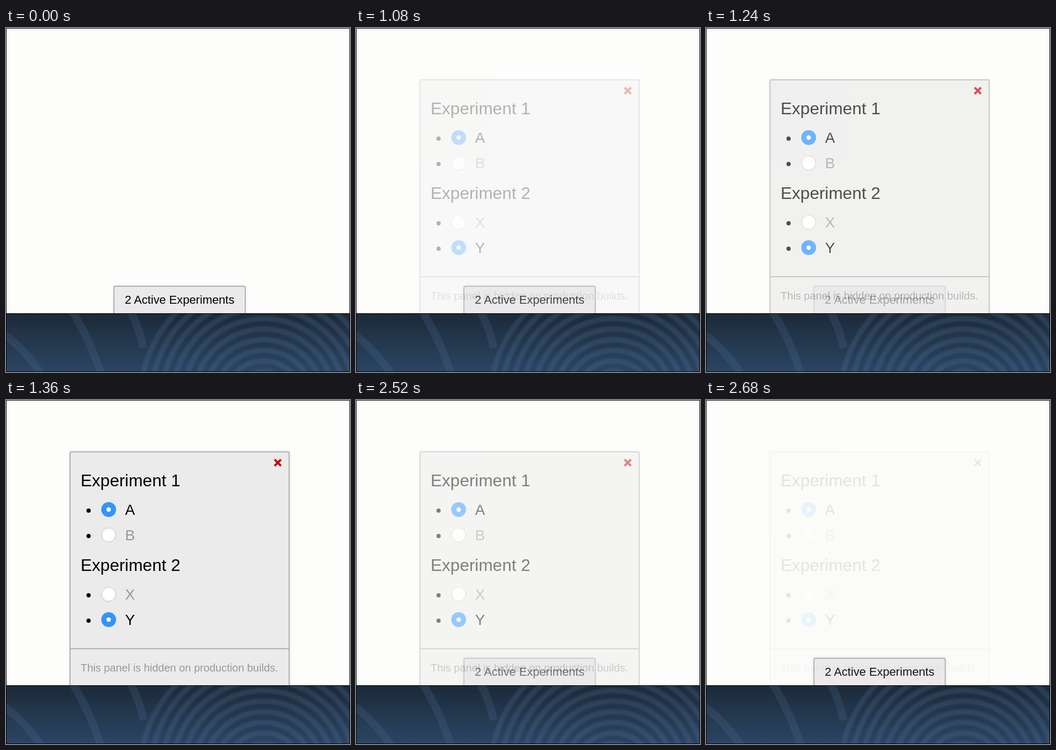
Animation of 650x650 px, one loop 2.72 s. Source, as an HTML page:

```html
<!DOCTYPE html>
<html lang="en">
<head>
<meta charset="utf-8">
<title>Experiments panel</title>
<style>
  html, body { margin: 0; width: 100%; height: 100%; overflow: hidden; background: #fdfefc; }
  svg { display: block; width: 100vw; height: 100vh; }
  text { font-family: "Liberation Sans", Arial, sans-serif; }
  .box { fill: #ebebeb; stroke: #b0b0b0; stroke-width: 2; filter: drop-shadow(0 0 2px rgba(0, 0, 0, .13)); }
  .button { fill: #ebe9ec; }
  .button-label { font-size: 22.2px; text-anchor: middle; }
  .heading { font-size: 32px; }
  .option { font-size: 28px; }
  .off { fill: #999; }
  .note { font-size: 20.3px; fill: #999; }

  /* The panel page cross-fades over the button in tenths, 40 ms each. */
  .panel { opacity: 0; animation: fade 2720ms infinite; }
  @keyframes fade {
    0%       { opacity: 0;  animation-timing-function: step-end; }
    36.7647% { opacity: .1; animation-timing-function: steps(9, end); }
    50%      { opacity: 1;  animation-timing-function: step-end; }
    86.7647% { opacity: .9; animation-timing-function: steps(9, end); }
    100%     { opacity: 0; }
  }
</style>
</head>
<body>
<svg viewBox="0 0 650 650">
  <defs>
    <linearGradient id="night" x2="0" y2="1">
      <stop offset="0" stop-color="#1c2a39"/>
      <stop offset=".5" stop-color="#24384e"/>
      <stop offset="1" stop-color="#2b4564"/>
    </linearGradient>
    <radialGradient id="rings" gradientUnits="userSpaceOnUse" cx="487" cy="702" r="20" spreadMethod="repeat">
      <stop offset="0" stop-color="#5a82ae" stop-opacity="0"/>
      <stop offset=".3" stop-color="#5a82ae" stop-opacity="0"/>
      <stop offset=".5" stop-color="#5a82ae" stop-opacity=".2"/>
      <stop offset=".8" stop-color="#5a82ae" stop-opacity=".2"/>
      <stop offset="1" stop-color="#5a82ae" stop-opacity="0"/>
    </radialGradient>
    <clipPath id="bar"><rect y="540" width="650" height="110"/></clipPath>
    <g id="radio-on">
      <circle r="14" fill="#3394fc"/>
      <circle r="4.2" fill="#fff"/>
    </g>
    <g id="radio-off">
      <circle r="13.5" fill="#fff" stroke="#b8b8b8"/>
      <path d="M-10 -8A13 13 0 0 1 10 -8" fill="none" stroke="#e4e4e4" stroke-width="2"/>
    </g>
  </defs>

  <rect width="650" height="540" fill="#fdfefc"/>
  <rect class="box button" x="204" y="488" width="248" height="80" rx="3"/>
  <text class="button-label" x="328" y="521">2 Active Experiments</text>

  <g class="panel">
    <rect width="650" height="540" fill="#fdfefc"/>
    <rect class="box" x="121" y="98" width="414" height="480" rx="3"/>
    <path d="M121 470H535" stroke="#b0b0b0" stroke-width="2"/>
    <path d="M507.5 112.5l12 12m0 -12l-12 12" stroke="#c8040c" stroke-width="4"/>
    <text class="heading" x="141" y="163">Experiment 1</text>
    <text class="heading" x="141" y="323">Experiment 2</text>
    <g id="options"></g>
    <text class="note" x="141" y="513">This panel is hidden on production builds.</text>
  </g>

  <g clip-path="url(#bar)">
    <rect y="540" width="650" height="110" fill="url(#night)"/>
    <circle cx="487" cy="702" r="240" fill="url(#rings)"/>
    <g fill="none" stroke="#5a82ae" stroke-opacity=".17" stroke-width="15">
      <path d="M-10 574Q35 606 68 656"/>
      <path d="M122 530Q160 590 180 656"/>
      <path d="M232 530Q252 565 260 605"/>
    </g>
  </g>
  <path d="M0 539.5H650M.5 .5H649.5V649.5H.5Z" fill="none" stroke="#000"/>
</svg>
<script>
  const option = (label, y, on) => `
    <circle cx="156" cy="${y + 2}" r="4"/>
    <use href="#radio-${on ? "on" : "off"}" x="194" y="${y}"/>
    <text class="option ${on ? "" : "off"}" x="225" y="${y + 10}">${label}</text>`;

  document.getElementById("options").innerHTML =
    option("A", 207, true) + option("B", 255, false) +
    option("X", 367, false) + option("Y", 415, true);
</script>
</body>
</html>
```
